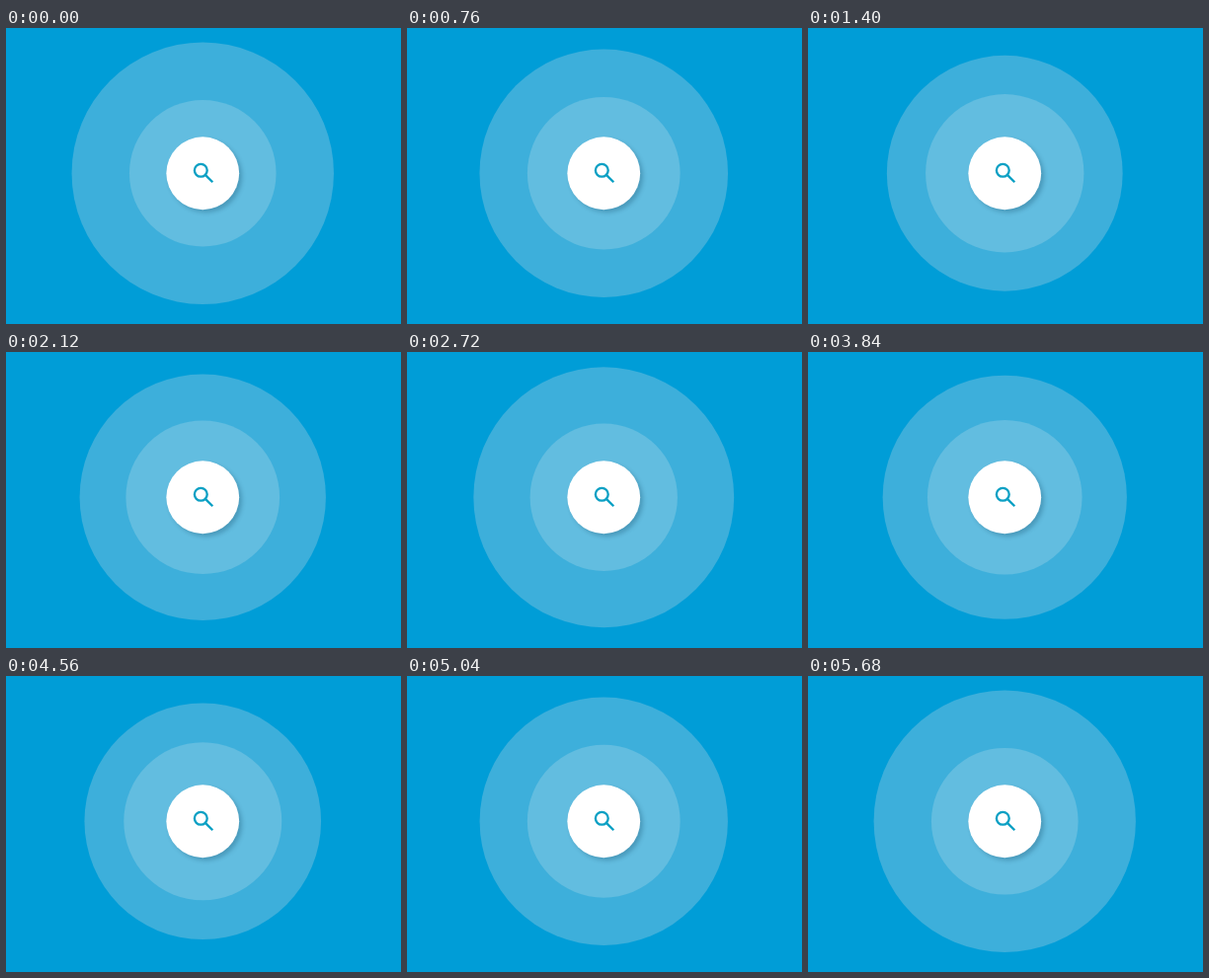
Write an HTML page with a canvas that moves like this. It is 400 px wide and 300 px high and loops after 5720 ms.

```html
<!DOCTYPE html>
<html lang="en">
<head>
<meta charset="utf-8">
<title>Search pulse</title>
<style>
html, body { margin: 0; width: 100%; height: 100%; overflow: hidden; background: #009dd7; }
canvas { display: block; width: 400px; height: 300px; }
</style>
</head>
<body>
<canvas id="stage" width="400" height="300"></canvas>
<script>
const canvas = document.getElementById('stage');
const ctx = canvas.getContext('2d');
const LOOP = 5720, STEP = 40;
const CX = 199.25, CY = 147.25;
const OUTER = [132.7, 119.3];
const INNER = [74.3, 80.2];
// Times at which the rings turn: widest, narrowest, widest, ...
const TURNS = [10, 1478, 2950, 4395, 5730];
// Short rests at each turn: [from, to]
const RESTS = [[0, 120], [1400, 1640], [2880, 3120], [4320, 4560], [5680, 5720]];

const lerp = ([a, b], k) => a + (b - a) * k;

// 0 = outer ring widest, 1 = outer ring narrowest
function pulse(t) {
  t = Math.floor(t / STEP) * STEP;
  const rest = RESTS.find(([from, to]) => t >= from && t < to);
  if (rest) t = rest[0];
  let i = 0;
  while (i < TURNS.length - 2 && t >= TURNS[i + 1]) i++;
  const p = (t - TURNS[i]) / (TURNS[i + 1] - TURNS[i]);
  const k = (1 - Math.cos(Math.PI * p)) / 2;
  return i % 2 ? 1 - k : k;
}

function disc(r, color) {
  ctx.fillStyle = color;
  ctx.beginPath();
  ctx.arc(CX, CY, r, 0, Math.PI * 2);
  ctx.fill();
}

function button() {
  ctx.save();
  ctx.shadowColor = 'rgba(0, 50, 80, 0.25)';
  ctx.shadowOffsetX = ctx.shadowOffsetY = 3;
  ctx.shadowBlur = 4;
  disc(36.9, '#fff');
  ctx.restore();
}

function glass() {
  ctx.save();
  ctx.translate(186.2, 133.2);
  ctx.scale(7 / 6, 7 / 6);
  ctx.strokeStyle = '#0ca0c4';
  ctx.lineWidth = 2;
  ctx.beginPath();
  ctx.arc(9.5, 9.5, 5.5, 0, Math.PI * 2);
  ctx.stroke();
  ctx.lineWidth = 2.1;
  ctx.beginPath();
  ctx.moveTo(13.6, 13.6);
  ctx.lineTo(19.75, 19.75);
  ctx.stroke();
  ctx.restore();
}

function draw(t) {
  const k = pulse(t);
  ctx.fillStyle = '#009dd7';
  ctx.fillRect(0, 0, 400, 300);
  disc(lerp(OUTER, k), '#3dafdb');
  disc(lerp(INNER, k), '#62bde0');
  button();
  glass();
}

const start = performance.now();
function tick() {
  draw((performance.now() - start) % LOOP);
  requestAnimationFrame(tick);
}
tick();
</script>
</body>
</html>
```
